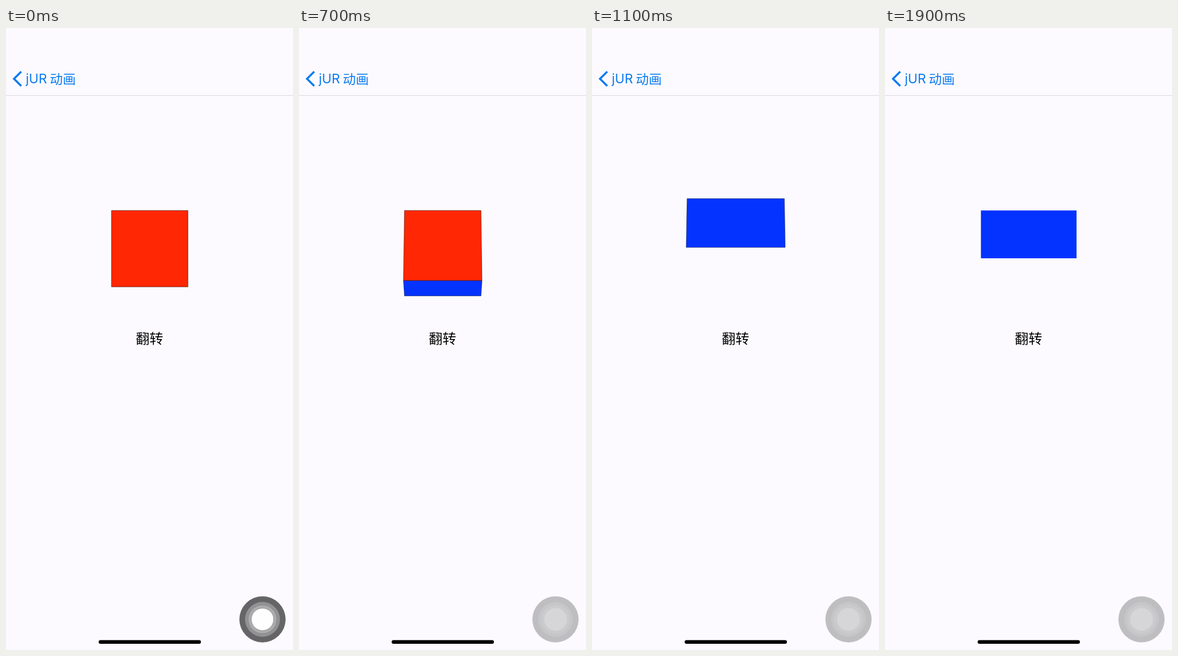
Write an HTML page that moves like this. It is 508 px wide and 1102 px high and loops after 2000 ms.

```html
<!DOCTYPE html>
<html lang="zh-CN">
<head>
<meta charset="utf-8">
<title>翻转</title>
<style>
  html, body { margin: 0; width: 100%; height: 100%; overflow: hidden; background: #fcfafe; }
  svg { display: block; width: 100%; height: 100%; }
  text { font-family: "Noto Sans CJK SC", "Noto Sans CJK", sans-serif; }
  .nav { font-size: 23px; font-weight: 300; fill: #0a7bf0; }
  .latin { font-family: Inter, sans-serif; font-weight: 400; }
  .title { font-size: 24.3px; font-weight: 350; text-anchor: middle; }
</style>
</head>
<body>
<svg viewBox="0 0 508 1102">
  <rect width="508" height="1102" fill="#fcfafe"/>
  <path d="M0 119.5H508" stroke="#d9d8db"/>
  <path d="M27 77.3 14.2 90 27 102.7" fill="none" stroke="#0a7bf0" stroke-width="3.6"/>
  <text class="nav"><tspan class="latin" x="35" y="98">jUR</tspan><tspan x="77.5" y="98.5">动画</tspan></text>
  <text class="title" x="254" y="558.7">翻转</text>
  <polygon id="front" fill="#ff2704" stroke="#000" stroke-opacity=".55" stroke-width=".9"/>
  <polygon id="under" fill="#0433ff" stroke="#000" stroke-width=".9"/>
  <g id="touch"></g>
  <rect x="164" y="1084.6" width="181" height="6.4" rx="3.2"/>
</svg>
<script>
const LOOP = 2000, STEP = 100;
const CX = 254.4, TOP = 323.3, UNIT = 1.354;
const front = document.getElementById('front');
const under = document.getElementById('under');

// radius, active grey, idle grey, active outline
const rings = [[40.5, 101, 190, 101], [30.5, 146, 198, 146], [25.3, 172, 203, 135], [19.8, 255, 214, 135]];
const circles = rings.map(([r]) => {
  const c = document.createElementNS('http://www.w3.org/2000/svg', 'circle');
  c.setAttribute('cx', 454);
  c.setAttribute('cy', 1047.7);
  c.setAttribute('r', r);
  return document.getElementById('touch').appendChild(c);
});

const lerp = (a, b, k) => a + (b - a) * k;
const grey = v => `rgb(${v},${v - 1},${v + 1})`;

// Underdamped spring, damping ratio 0.5
function spring(t) {
  if (t >= 1700) return 1;
  const u = t < 900 ? Math.max(0, 2.485 + (t - 900) * .00785) : 2.485 + (t - 900) * .01236;
  const w = Math.sqrt(.75);
  return 1 - Math.exp(-u / 2) * (Math.cos(w * u) + .5 / w * Math.sin(w * u));
}

// A box 100 wide, 100 tall and 50 deep turns about its top front edge while the perspective grows.
function drawBox(p) {
  const a = p * Math.PI / 2, cos = Math.cos(a), sin = Math.sin(a);
  const edge = (y, z) => {
    const s = UNIT / (1 - (y * sin + z * cos) * p / 500);
    return { half: 50 * s, y: TOP + (y * cos - z * sin) * s };
  };
  const quad = (el, e, f, shown) => {
    el.style.display = shown ? '' : 'none';
    el.setAttribute('points',
      `${CX - e.half},${e.y} ${CX + e.half},${e.y} ${CX + f.half},${f.y} ${CX - f.half},${f.y}`);
  };
  const hinge = edge(0, 0), fold = edge(100, 0), back = edge(100, -50);
  quad(front, hinge, fold, cos > .001);
  quad(under, fold, back, p > 0 && back.y > fold.y);
  under.setAttribute('stroke-opacity', Math.abs(p - 1) < .005 ? 0 : .5);
}

function drawTouch(k) {
  rings.forEach(([, on, off, line], i) => {
    circles[i].setAttribute('fill', grey(Math.round(lerp(on, off, k))));
    circles[i].setAttribute('stroke', grey(Math.round(lerp(line, off, k))));
    circles[i].setAttribute('stroke-width', .8);
  });
}

function draw(now) {
  const t = Math.floor(now % LOOP / STEP) * STEP;
  drawBox(spring(t));
  drawTouch(Math.min(1, t / 300));
}

const start = performance.now();
function tick() {
  draw(performance.now() - start);
  requestAnimationFrame(tick);
}
tick();
</script>
</body>
</html>
```
